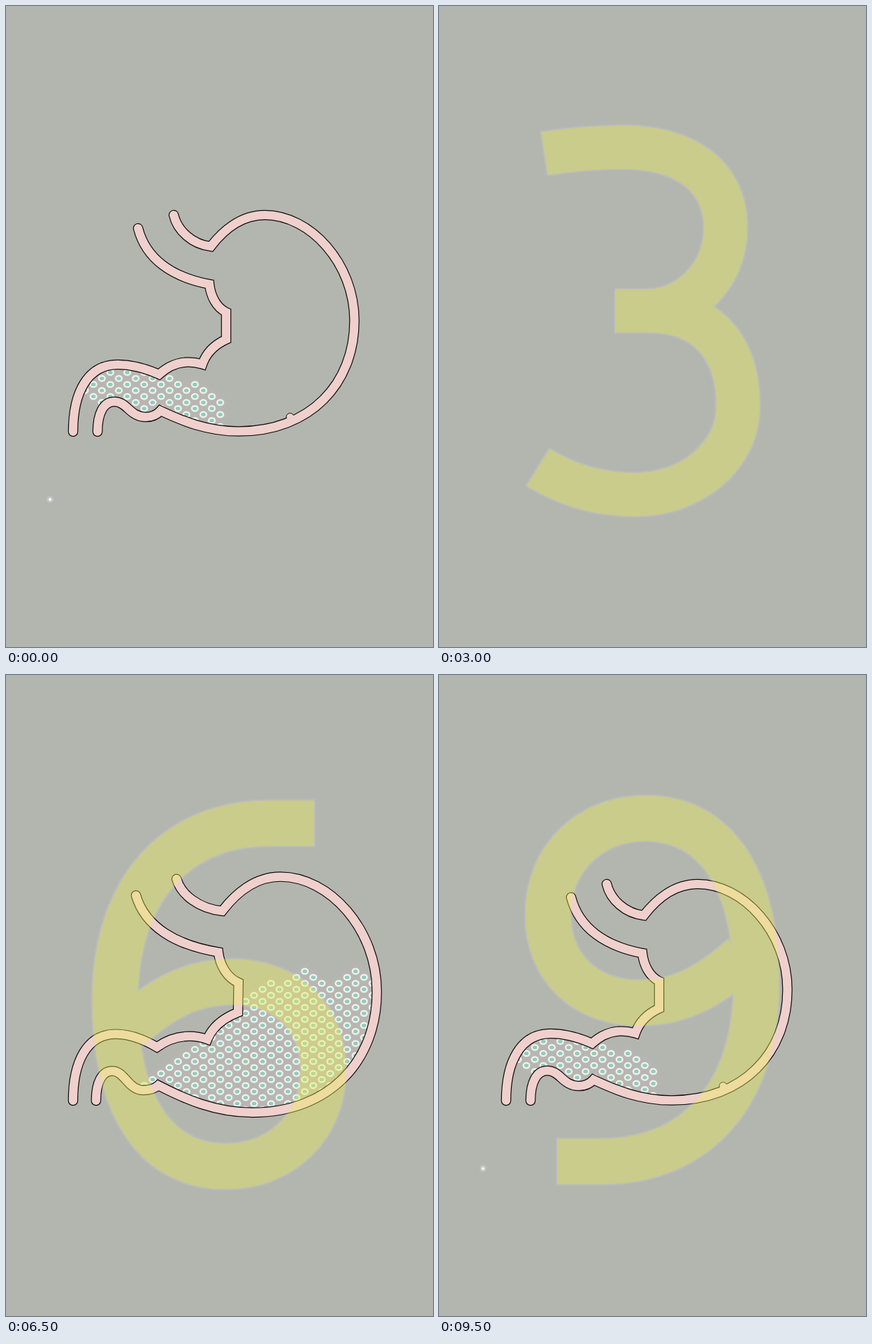
These frames come from a looping animation (611 px wide and 917 px high, 10000 ms). An HTML page:

```html
<!DOCTYPE html>
<html lang="en">
<head>
<meta charset="utf-8">
<title>Counting stomach</title>
<style>
  html, body { margin: 0; width: 100%; height: 100%; overflow: hidden; background: #b3b6af; }
  svg { display: block; width: 100vw; height: 100vh; }
  .wall { fill: none; stroke-linecap: round; stroke-miterlimit: 6; }
</style>
</head>
<body>
<svg viewBox="0 0 611 917" preserveAspectRatio="none">
  <defs>
    <clipPath id="inside"><path id="cavity"/></clipPath>
    <filter id="soft" x="-50%" y="-50%" width="200%" height="200%"><feGaussianBlur stdDeviation="1"/></filter>
    <filter id="haze" x="-20%" y="-20%" width="140%" height="140%"><feGaussianBlur stdDeviation="2.5"/></filter>
    <filter id="rim" filterUnits="userSpaceOnUse" x="0" y="0" width="611" height="917" color-interpolation-filters="sRGB">
      <feMorphology in="SourceAlpha" operator="dilate" radius="1"/>
      <feGaussianBlur stdDeviation="1" result="glow"/>
      <feFlood flood-color="#d6d2e2"/>
      <feComposite in2="glow" operator="in"/>
      <feComposite in2="SourceAlpha" operator="out" result="ring"/>
      <feMerge><feMergeNode in="ring"/><feMergeNode in="SourceGraphic"/></feMerge>
    </filter>
    <g id="cell">
      <ellipse rx="6" ry="5.2" fill="#e6eee8" opacity=".45"/>
      <ellipse rx="4.3" ry="3.6" fill="#95cabb" stroke="#eef6f1" stroke-width="2"/>
    </g>
  </defs>
  <rect width="611" height="917" fill="#b3b6af"/>
  <g id="stomach">
    <g clip-path="url(#inside)">
      <g id="fluid" fill="#b9b5b1" filter="url(#haze)"></g>
      <g id="cells"></g>
    </g>
    <path id="edge" class="wall" stroke="#0c0a0a" stroke-width="14.6"/>
    <circle id="bump" cx="406.5" cy="588" r="5.5" fill="#efd0cd" stroke="#0c0a0a"/>
    <path id="skin" class="wall" stroke="#efd0cd" stroke-width="12.2"/>
    <g id="speck" fill="#fff">
      <circle r="4" opacity=".35" filter="url(#soft)"/>
      <circle r="1.7"/>
    </g>
  </g>
  <g opacity=".4" filter="url(#rim)">
    <path id="digit" stroke="#ecef57" stroke-miterlimit="2.5"/>
  </g>
</svg>
<script>
const $ = id => document.getElementById(id);
const set = (id, attrs) => Object.entries(attrs).forEach(([k, v]) => $(id).setAttribute(k, v));
const show = (id, on) => { $(id).style.display = on ? '' : 'none'; };
const clamp = v => Math.min(1, Math.max(0, v));
const STEP = 500, STEPS = 20;

// Digits are drawn as broad pen strokes
const oval = (x, y, rx, ry) =>
  `M${x - rx},${y}a${rx},${ry} 0 1 0 ${2 * rx},0a${rx},${ry} 0 1 0 ${-2 * rx},0Z`;
const six = 'M441,212H378C240,212 156,310 156,465C156,610 210,703 314,703C395,703 454,645 454,565C454,490 402,439 323,439C258,439 215,470 175,505';
const digits = [
  oval(304.5, 452, 187, 247),
  'M299,199H364V714H294V273L239,322L206,288Z',
  'M150,235Q212,206 275,206C362,206 410,255 410,325C410,430 250,560 185,682H465',
  'M151,211Q210,202 262,202C355,202 410,245 410,317C410,388 355,436 300,436H252M300,436C385,436 428,490 428,572C428,645 360,699 281,699Q205,699 142,660',
  'M490,551H150L366,205V714',
  'M493,219H195V420H323C410,420 463,472 463,553C463,625 390,697 300,697Q210,697 147,676',
  six,
  'M140,221H481M455,229L330,376C240,480 188,580 198,714',
  oval(305, 322, 128, 117) + oval(305, 569, 148, 130),
  six
];

function drawDigit(n) {
  const solid = n === 1;
  set('digit', {
    d: digits[n],
    fill: solid ? '#ecef57' : 'none',
    'stroke-width': solid ? 0 : n === 3 ? 62 : 65,
    transform: n === 9 ? 'rotate(180 305 454)' : ''
  });
}

// Resting walls: anchors, and curve handles as per-axis fractions of each segment
const points = text => text.split(' ').map(p => p.split(',').map(Number));
const outer = {
  anchors: points('240,299 293,344 370,299 498.5,450 333,608.5 221,579 200,588 155,566 131,609'),
  bends: points('.1,.5 .5,.93 .22,.49 .56,1 .51,0 1,.46 0,.57 .38,1 .4,0 .72,.5 .25,.65 .6,1 .5,0 .6,1 .65,0 1,.4')
};
const inner = {
  anchors: points('96,609 160,513 219,527 261,509.5 281,512.5 315,477 315,438 291,398 189,318'),
  bends: points('0,.58 .32,1 .35,0 .7,.45 .3,.65 .65,1 .4,0 .7,.4 .15,.42 .5,.78 .3,.3 .7,.7 .54,.15 .92,.55 .52,.125 .89,.45')
};

const wave = (x, crest) => Math.cos((x - crest) * 2 * Math.PI / 73);

// row: lattice offset, drain: lower limit in the duct, surface: fluid level at x
const states = [
  { stretch: 0, lift: 0, row: 550, drain: 480, speck: [63, 706, 1],
    surface: x => x < 313 ? 528 + .35 * (x - 235) : Infinity },
  { stretch: .18, lift: 2, row: 550, drain: 520, speck: [63, 706, 1],
    surface: x => 535 - 5 * wave(x, 404) },
  { stretch: .33, lift: 9.5, row: 559.5, drain: 520, speck: [157, 781, .45],
    surface: x => 493 - 5 * wave(x, 404) },
  { stretch: 1, lift: 0, row: 561.5, drain: 520,
    surface: x => 429 - 6 * wave(x, 428) + .8 * Math.max(0, 390 - x) },
  { stretch: 1.7, lift: 0, row: 561.5, drain: 520,
    surface: x => 370 - 6 * wave(x, 428) }
];

// The body swells rightwards and up and down; the duct end stays put
function swell([x, y], { stretch, lift }) {
  const body = clamp((x + Math.max(0, 450 - y) / 5 - 245) / 75);
  const dx = 21 * body - 3 * clamp((x - 95) / 50) + .075 * Math.max(0, x - 310);
  const dy = .09 * (y - 415) * clamp((x - 150) / 130);
  const raise = clamp((x - 200) / 85) * clamp((600 - y) / 80);
  return [x + dx * stretch, y + dy * stretch ** 1.6 - lift * raise];
}

function wall({ anchors, bends }, state) {
  const pts = anchors.map(p => swell(p, state));
  const curves = pts.slice(1).map((b, i) => {
    const a = pts[i];
    const handle = f => a.map((v, j) => v + (b[j] - v) * f[j]);
    return `C${handle(bends[2 * i])} ${handle(bends[2 * i + 1])} ${b}`;
  });
  return pts[0] + curves.join('');
}

function cellSpots({ row, drain, surface }) {
  const spots = [];
  for (let k = -1; k < 38; k++) {
    const x = 113 + 12.1 * k;
    const first = row + (k % 2 ? 8.6 : 0) - 15 * 17.2;
    for (let y = first; y < Math.min(670, drain + .67 * x); y += 17.2) {
      if (y >= surface(x)) spots.push([x.toFixed(1), y.toFixed(1)]);
    }
  }
  return spots;
}

function drawStomach(level) {
  const state = states[level];
  const a = wall(outer, state), b = wall(inner, state);
  set('edge', { d: `M${a}M${b}` });
  set('skin', { d: `M${a}M${b}` });
  set('cavity', { d: `M${a}L${b}Z` });
  const spots = cellSpots(state);
  $('fluid').innerHTML = spots.map(([x, y]) => `<circle cx="${x}" cy="${y}" r="9"/>`).join('');
  $('cells').innerHTML = spots.map(([x, y]) => `<use href="#cell" x="${x}" y="${y}"/>`).join('');
  show('bump', level === 0);
  const [x, y, opacity] = state.speck || [0, 0, 0];
  set('speck', { transform: `translate(${x} ${y})`, opacity });
}

let shown = -1;
function draw(time) {
  const step = Math.floor(time / STEP) % STEPS;
  if (step === shown) return;
  shown = step;
  const n = Math.floor(step / 2);
  const full = step === 0 || (step % 2 === 1 && step > 1);
  show('stomach', full);
  if (full) drawStomach(Math.min(n, 9 - n));
  show('digit', step > 0);
  drawDigit(n);
}

const start = performance.now();
function tick() {
  draw(performance.now() - start);
  requestAnimationFrame(tick);
}
tick();
</script>
</body>
</html>
```
